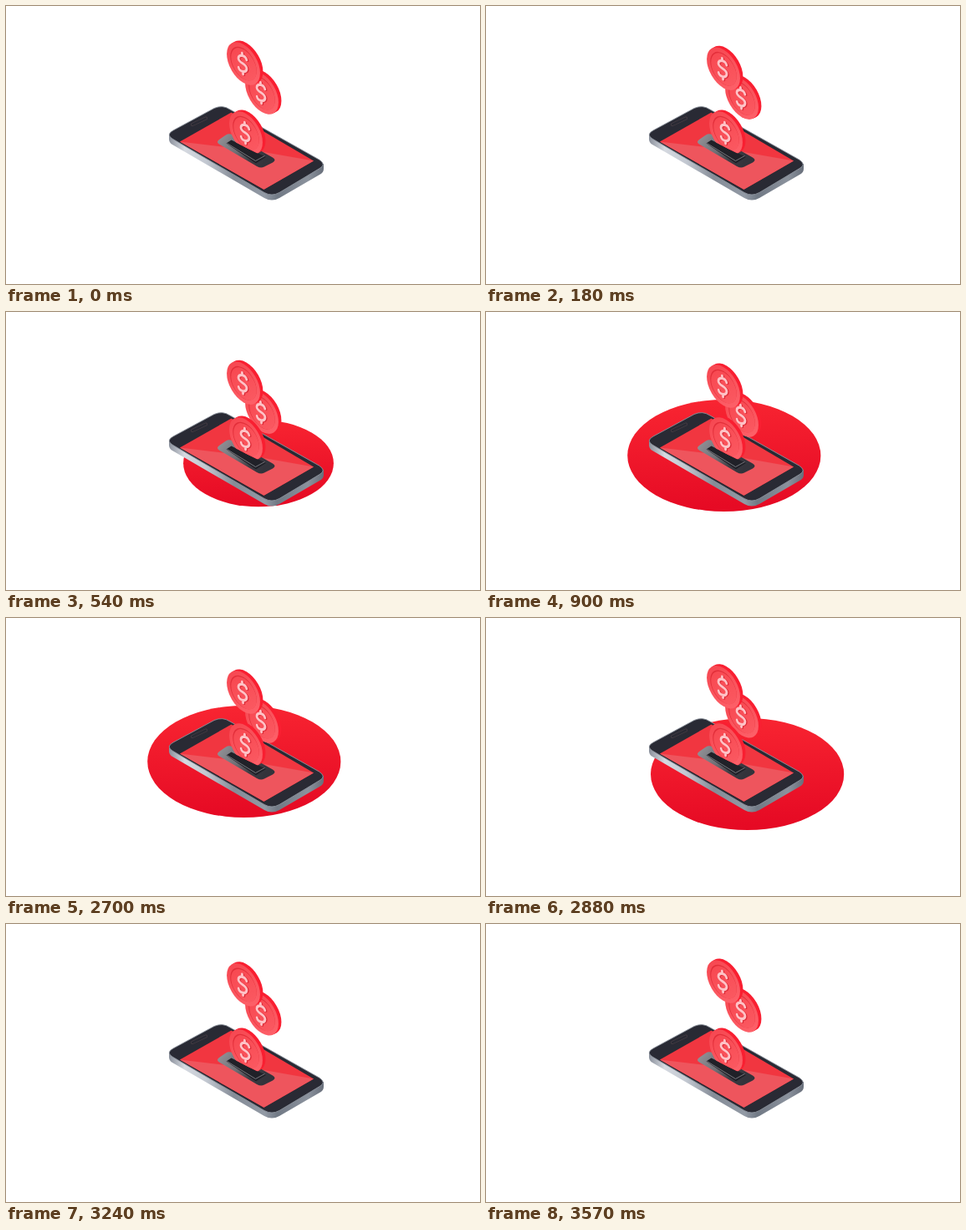
These frames come from a looping animation (567 px wide and 333 px high, 3.6 s). An HTML page:

```html
<!DOCTYPE html>
<html lang="en">
<head>
<meta charset="utf-8">
<title>Coins into phone</title>
<style>
html, body { margin: 0; width: 100%; height: 100%; overflow: hidden; background: #fff; }
svg { display: block; width: 567px; height: 333px; }
</style>
</head>
<body>
<svg viewBox="0 0 567 333" xmlns="http://www.w3.org/2000/svg">
  <defs>
    <linearGradient id="disc" x1="0" y1="0" x2="0.1" y2="1">
      <stop offset="0" stop-color="#f92632"/>
      <stop offset="1" stop-color="#e60a24"/>
    </linearGradient>
    <linearGradient id="side" gradientUnits="userSpaceOnUse" x1="195" y1="0" x2="380" y2="0">
      <stop offset="0" stop-color="#8a909b"/>
      <stop offset="0.1" stop-color="#d5d9e0"/>
      <stop offset="0.24" stop-color="#c3c8d1"/>
      <stop offset="0.42" stop-color="#858c97"/>
      <stop offset="0.62" stop-color="#929aa5"/>
      <stop offset="0.7" stop-color="#717985"/>
      <stop offset="0.9" stop-color="#8b929d"/>
      <stop offset="1" stop-color="#686f7b"/>
    </linearGradient>
    <linearGradient id="plate" x1="0" y1="0" x2="1" y2="0.4">
      <stop offset="0" stop-color="#96969b"/>
      <stop offset="0.45" stop-color="#707076"/>
      <stop offset="0.75" stop-color="#3d3d44"/>
      <stop offset="1" stop-color="#33333b"/>
    </linearGradient>
    <linearGradient id="rim" x1="0" y1="0" x2="1" y2="1">
      <stop offset="0" stop-color="#f5434d"/>
      <stop offset="1" stop-color="#fe656d"/>
    </linearGradient>
    <linearGradient id="well" x1="0" y1="0" x2="1" y2="1">
      <stop offset="0" stop-color="#f7464f"/>
      <stop offset="1" stop-color="#fb5b63"/>
    </linearGradient>
    <clipPath id="slotCut"><path d="M250 100H330V191L262 157L250 151Z"/></clipPath>

    <path id="sign" fill="none" stroke-width="3.200" stroke-linecap="round"
      d="M5.500 -5.500C4 -11 -6 -10.500 -5.700 -5.200C-5.400 .5 5.700 -1 5.700 5C5.700 10.800 -4.500 11 -5.500 5.500M-.6 -9.500V-12.500M.6 9.500V12.500"/>

    <!-- Coin face centred on the origin, edge receding up and right -->
    <g id="coin">
      <g fill="#f91f31">
        <circle r="23" transform="matrix(.866 .5 0 1 3.5 -1.8)"/>
        <circle r="23" transform="matrix(.866 .5 0 1 1.8 -.9)"/>
      </g>
      <g transform="matrix(.866 .5 0 1 0 0)">
        <circle r="23" fill="url(#rim)"/>
        <circle r="18.2" fill="#e32f3a"/>
        <circle r="17.6" cx=".6" cy=".5" fill="url(#well)"/>
      </g>
      <g transform="matrix(.87 .2 0 1 -1 0)">
        <use href="#sign" x="1.500" y=".4" stroke="#dc2c38"/>
        <use href="#sign" stroke="#ffc3c7"/>
      </g>
    </g>
  </defs>

  <ellipse id="pool" rx="115.600" ry="67" fill="url(#disc)"/>

  <g id="phone">
    <path fill="url(#side)" d="M195 154V160Q195.500 164 199 166L309 230Q318 235 327 230L376 201.500Q380 199 380 195V189L318 190Z"/>
    <path fill="#292a34" stroke="#8c929c" stroke-width=".9"
      d="M200 149L249 122.500Q259 118 268 124L374.500 184Q383 189.500 376 194L327 223.500Q318 228.500 309 223.500L199 159Q191 154 200 149Z"/>
    <path fill="#f13640" d="M208 162.500L269.500 127.500L368 185.500L308.500 219.800Z"/>
    <path fill="#ee555d" d="M208 162.500L300 173.500L368 185.500L308.500 219.800Z"/>
    <path d="M223 142L239 134.500" stroke="#4c4148" stroke-width="4" stroke-linecap="round"/>
    <path d="M223 142L239 134.500" stroke="#292a34" stroke-width="2.600" stroke-linecap="round"/>
    <path fill="url(#plate)" d="M255 160L263 154.500Q267 152 271 154.500L319 181.500Q324 184.500 319 187.500L309 192.500Q305 194.800 300 192L255 165.500Q251 163 255 160Z"/>
    <path fill="#202128" d="M263.500 164.500L269.500 160.500L311 181L299 188.500Z"/>
    <path fill="none" stroke="#8b8b90" stroke-width=".8" d="M264.500 164.500L298.500 185.500L309.500 179.500"/>
  </g>

  <g id="falling">
    <use href="#coin" x="306" y="104"/>
    <use href="#coin" x="284" y="69"/>
  </g>
  <g clip-path="url(#slotCut)"><use href="#coin" x="287" y="152"/></g>
</svg>
<script>
const LOOP = 3600, MOVE = 900, STEP = 30;
const pool = document.getElementById("pool");
const falling = document.getElementById("falling");

const clamp = v => Math.min(1, Math.max(0, v));
const sineOut = p => Math.sin(clamp(p) * Math.PI / 2);
const quadInOut = p => p < .5 ? 2 * p * p : 1 - 2 * (1 - p) ** 2;

function draw(ms) {
  const t = Math.floor(ms % LOOP / STEP) * STEP;
  const leaving = t >= LOOP - MOVE;
  const settled = leaving
    ? 1 - sineOut((t - LOOP + MOVE) / MOVE)
    : sineOut(t / MOVE);
  // The disc grows and shrinks over the same span at either end of the loop.
  const size = quadInOut(clamp((Math.min(t, LOOP - t) - 360) / 270));
  const away = 1 - settled;

  falling.setAttribute("transform", `translate(0 ${20 * settled})`);
  pool.setAttribute("transform",
    `translate(${284.8 + 90 * away} ${172 + 48.5 * away}) scale(${size})`);
  pool.setAttribute("visibility", size > 0 ? "visible" : "hidden");
}

const start = performance.now();
function tick() {
  draw(performance.now() - start);
  requestAnimationFrame(tick);
}
draw(0);
requestAnimationFrame(tick);
</script>
</body>
</html>
```
